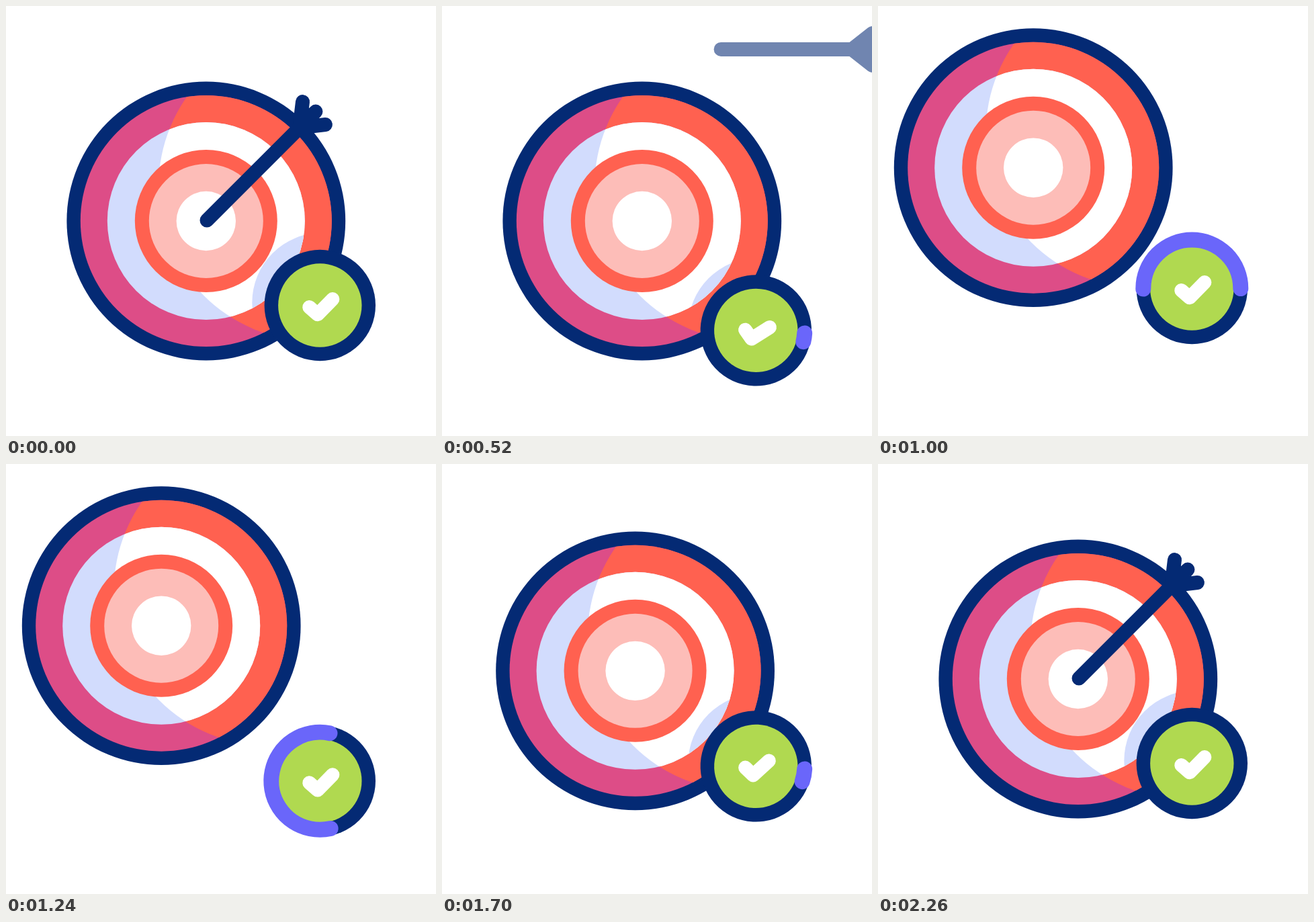
These frames come from a looping animation (640 px wide and 640 px high, 2.4 s). An HTML page with a canvas:

```html
<!DOCTYPE html>
<html lang="en">
<head>
<meta charset="utf-8">
<title>Target reached</title>
<style>
  html, body { margin: 0; width: 100%; height: 100%; overflow: hidden; background: #fff; }
  canvas { display: block; width: 640px; height: 640px; }
</style>
</head>
<body>
<canvas id="stage" width="640" height="640"></canvas>
<script>
const ctx = document.getElementById('stage').getContext('2d');
const LOOP = 2400;
const TAU = Math.PI * 2;
const rad = deg => deg * Math.PI / 180;

const NAVY = '#042a74', CORAL = '#ff6150', PINK = '#dd4d87', PALE = '#d2dcfd';
const PEACH = '#fdbdb8', GREEN = '#b0d950', VIOLET = '#6a66fa', WHITE = '#fff';

// Keyframes as [time, value], eased in and out between neighbours.
const tracks = {
  away: [[600, 0], [1000, 1], [1400, 1], [1800, 0]],
  badgeY: [[200, 0], [548, 38], [870, -25], [1000, -25], [1333, 38], [1800, 0]],
  badgeTurn: [[400, 0], [600, 20.5], [800, 0], [1240, 0], [1400, 20.5], [1800, 0]],
  head: [[400, 0], [1600, 360]],
  tail: [[1000, 0], [1800, 360]],
  shotOut: [[200, 0], [667, 204]],
  shotTurn: [[200, 0], [500, 45]],
  fadeOut: [[400, 1], [667, 0]],
  shotIn: [[1800, 110], [1980, 165], [2200, 0]],
  fadeIn: [[1800, 0], [1980, 1]]
};

function at(name, t) {
  const keys = tracks[name];
  if (t <= keys[0][0]) return keys[0][1];
  for (let i = 1; i < keys.length; i++) {
    const [t0, v0] = keys[i - 1], [t1, v1] = keys[i];
    if (t < t1) {
      const u = (t - t0) / (t1 - t0);
      return v0 + (v1 - v0) * u * u * (3 - 2 * u);
    }
  }
  return keys[keys.length - 1][1];
}

function disc(x, y, r, color) {
  ctx.fillStyle = color;
  ctx.beginPath();
  ctx.arc(x, y, r, 0, TAU);
  ctx.fill();
}

function line(points, width, color) {
  ctx.strokeStyle = color;
  ctx.lineWidth = width;
  ctx.beginPath();
  points.forEach(([x, y]) => ctx.lineTo(x, y));
  ctx.stroke();
}

// A disc whose left part lies outside the lit circle and is shaded.
function shadedDisc(r, light, shade, extra) {
  disc(0, 0, r, shade);
  ctx.save();
  ctx.beginPath();
  ctx.arc(0, 0, r, 0, TAU);
  ctx.clip();
  disc(160, -52, 230.7, light);
  if (extra) extra();
  ctx.restore();
}

function drawTarget(x, y, badgeX, badgeY) {
  ctx.save();
  ctx.translate(x, y);
  disc(0, 0, 207.4, NAVY);
  shadedDisc(187, CORAL, PINK);
  shadedDisc(147, WHITE, PALE, () => disc(badgeX + 3 - x, badgeY - 4 - y, 104, PALE));
  disc(0, 0, 106, CORAL);
  disc(0, 0, 85, PEACH);
  disc(0, 0, 44.2, WHITE);
  ctx.restore();
}

function drawArrow(t) {
  const leaving = t < 1200;
  const alpha = at(leaving ? 'fadeOut' : 'fadeIn', t);
  if (alpha <= 0) return;
  const shift = at(leaving ? 'shotOut' : 'shotIn', t);
  const turn = leaving ? at('shotTurn', t) : 0;
  const pivot = 138.5;
  ctx.save();
  // Mixing towards white keeps overlapping strokes even; alpha is used on one path.
  ctx.globalAlpha = alpha;
  ctx.translate(299 + pivot * Math.SQRT1_2 + shift, 319 - pivot * Math.SQRT1_2 - shift);
  ctx.rotate(rad(turn - 45));
  ctx.translate(-pivot, 0);
  ctx.strokeStyle = NAVY;
  ctx.lineWidth = 21;
  ctx.beginPath();
  ctx.moveTo(0, 0);
  ctx.lineTo(229, 0);
  ctx.moveTo(225.5, -24);
  ctx.lineTo(195, 0);
  ctx.lineTo(225.5, 24);
  ctx.stroke();
  ctx.restore();
}

function drawBadge(x, y, t) {
  const head = at('head', t), tail = at('tail', t);
  ctx.save();
  ctx.translate(x, y);
  ctx.rotate(rad(at('badgeTurn', t)));
  disc(0, 0, 82.7, NAVY);
  disc(0, 0, 62.2, GREEN);
  if (head - tail > 0.01) {
    ctx.strokeStyle = VIOLET;
    ctx.lineWidth = 23;
    ctx.beginPath();
    ctx.arc(0, 0, 72.5, rad(-tail), rad(-head), true);
    ctx.stroke();
  }
  line([[-15.8, 2.8], [-3.5, 13.6], [18.8, -9.2]], 20.5, WHITE);
  ctx.restore();
}

function draw(t) {
  ctx.fillStyle = WHITE;
  ctx.fillRect(0, 0, 640, 640);
  ctx.lineCap = ctx.lineJoin = 'round';
  const away = at('away', t);
  const badgeX = 467.3, badgeY = 445.5 + at('badgeY', t);
  drawTarget(297.8 - 66.6 * away, 320 - 79.3 * away, badgeX, badgeY);
  drawArrow(t);
  drawBadge(badgeX, badgeY, t);
}

const start = performance.now();
function tick() {
  draw((performance.now() - start) % LOOP);
  requestAnimationFrame(tick);
}
tick();
</script>
</body>
</html>
```
